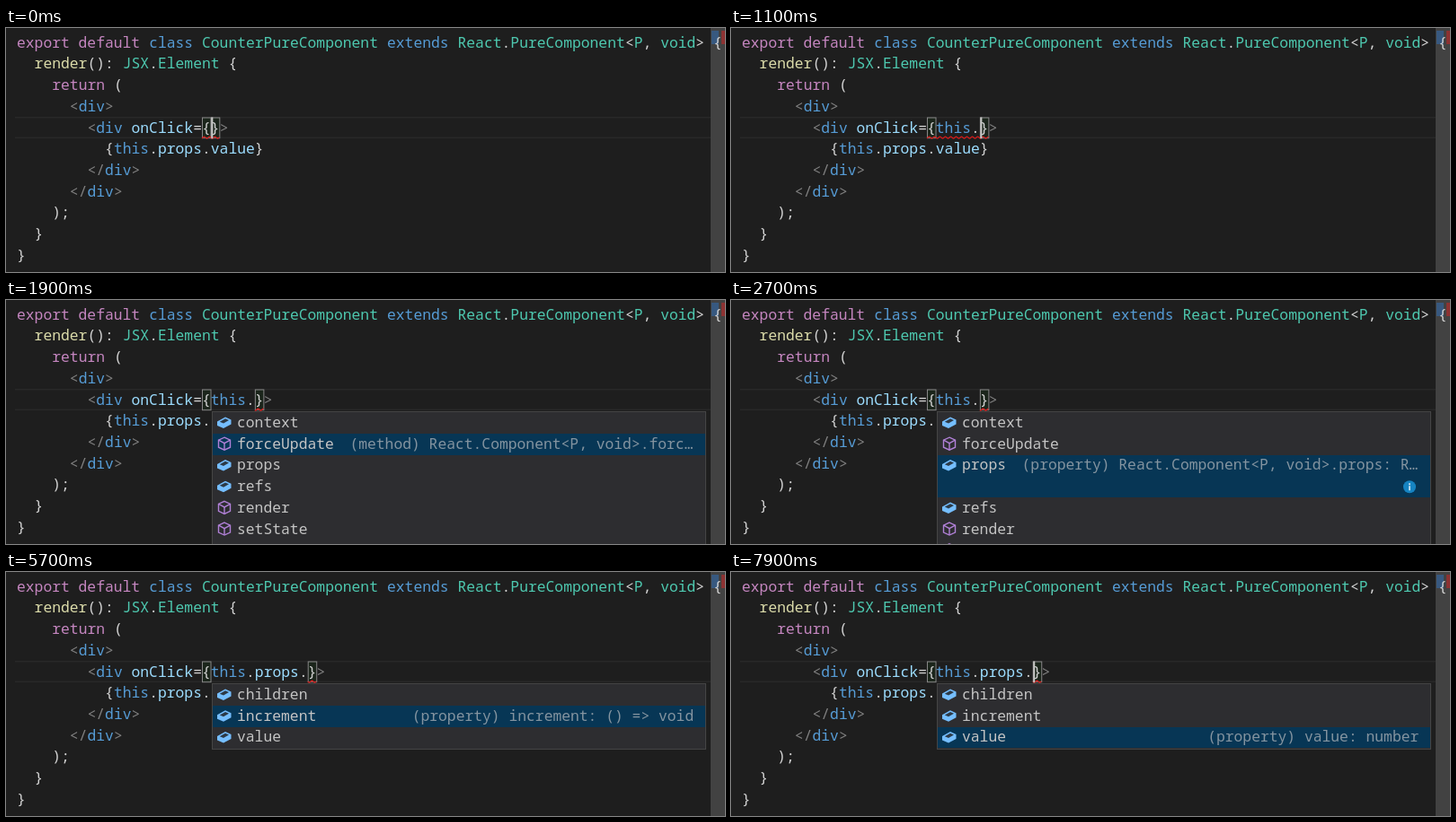
Animation of 800x272 px, one loop 8 s. Source, as an HTML page with a canvas:

```html
<!DOCTYPE html>
<html lang="en">
<head>
<meta charset="utf-8">
<title>Editor completion</title>
<style>
html, body { margin: 0; width: 100%; height: 100%; overflow: hidden; background: #1e1e1e; }
canvas { display: block; width: 800px; height: 272px; }
</style>
</head>
<body>
<canvas id="stage" width="800" height="272"></canvas>
<script>
const ctx = document.getElementById('stage').getContext('2d');
const LOOP = 8000, LEFT = 12, CHAR = 9.81, LINE = 23.72;
const FONT = '16.33px "Noto Sans Mono", "DejaVu Sans Mono", monospace';
const BRACE_COL = 21, EDIT_LINE = 4, ROW_TOP = 125.3;

// The first character of each token selects its colour.
const COLORS = {
  p: '#c586c0', b: '#569cd6', t: '#4ec9b0', f: '#dcdcaa',
  v: '#9cdcfe', w: '#d4d4d4', g: '#808080'
};
const CODE = [
  [0, 'pexport default ', 'bclass ', 'tCounterPureComponent ', 'bextends ', 'tReact',
    'w.', 'tPureComponent', 'w<', 'tP', 'w, ', 'tvoid', 'w> {'],
  [2, 'frender', 'w(): ', 'tJSX', 'w.', 'tElement', 'w {'],
  [4, 'preturn', 'w ('],
  [6, 'g<', 'bdiv', 'g>'],
  [8],
  [10, 'w{', 'bthis', 'w.', 'vprops', 'w.', 'vvalue', 'w}'],
  [8, 'g</', 'bdiv', 'g>'],
  [6, 'g</', 'bdiv', 'g>'],
  [4, 'w);'],
  [2, 'w}'],
  [0, 'w}']
];

const COMPONENT = 'React.Component<P, void>';
const prop = (name, detail) => ({ name, icon: 'property', detail: `(property) ${detail}` });
const method = (name, detail) => ({ name, icon: 'method', detail });
const type = (name, ...hits) => ({ name, icon: 'interface', hits });

const TYPES = [
  type('RTCIceTransportStateChangedEvent', 1, 21),
  type('RTCRtpHeaderExtension', 1, 6),
  type('RTCRtpHeaderExtensionParameters', 1, 6),
  type('RTCRtpUnhandled', 1, 8),
  type('SVGTextPathElement', 3, 10),
  type('Touch', 0, 4)
];
const MEMBERS = [
  prop('context', COMPONENT + '.contex…'),
  method('forceUpdate', `(method) ${COMPONENT}.forc…`),
  prop('props', COMPONENT + '.props: R…'),
  prop('refs', COMPONENT + '.refs'),
  method('render'),
  method('setState')
];
const PROPS = [
  prop('children', 'children: React.ReactNode'),
  prop('increment', 'increment: () => void'),
  prop('value', 'value: number')
];

// Each step overrides part of the editor state from its time on.
const STEPS = [
  [0, { typed: [], cursor: true, squiggle: [21, 23] }],
  [400, { cursor: false }],
  [800, { typed: ['vth'], cursor: true, squiggle: [21, 25] }],
  [900, { typed: ['vthi'], list: TYPES, squiggle: [21, 26] }],
  [1000, { typed: ['bthis'], list: null, squiggle: [21, 27] }],
  [1100, { typed: ['bthis', 'w.'], squiggle: [21, 28] }],
  [1200, { list: MEMBERS, selected: 0, detail: false }],
  [1300, { detail: true }],
  [1500, { squiggle: [27, 28] }],
  [1700, { cursor: false }],
  [1900, { selected: 1 }],
  [2100, { selected: 2 }],
  [2200, { expanded: true, cursor: true }],
  [2700, { cursor: false }],
  [3200, { cursor: true }],
  [3700, { cursor: false }],
  [4200, { typed: ['bthis', 'w.', 'vprops'], list: null, expanded: false, cursor: true, squiggle: null }],
  [4500, { squiggle: [13, 33] }],
  [4700, { cursor: false }],
  [4900, { typed: ['bthis', 'w.', 'vprops', 'w.'], list: PROPS, selected: 0, cursor: true }],
  [5200, { squiggle: [33, 34] }],
  [5400, { cursor: false }],
  [5700, { selected: 1 }],
  [5900, { cursor: true }],
  [6400, { cursor: false }],
  [6600, { selected: 2 }],
  [6900, { cursor: true }],
  [7400, { cursor: false }],
  [7900, { cursor: true }]
];

const colX = col => LEFT + col * CHAR;
const rowY = row => ROW_TOP + row * LINE;

function rect(color, x, y, w, h) {
  ctx.fillStyle = color;
  ctx.fillRect(x, y, w, h);
}

function text(str, x, y, color, weight = '') {
  ctx.font = `${weight} ${FONT}`;
  ctx.fillStyle = color;
  ctx.fillText(str, x, y);
}

function path(points, close) {
  ctx.beginPath();
  points.forEach(([x, y]) => ctx.lineTo(x, y));
  if (close) ctx.closePath();
}

function circle(x, y, r) {
  ctx.beginPath();
  ctx.arc(x, y, r, 0, Math.PI * 2);
}

function drawLine([col, ...tokens], row) {
  for (const token of tokens) {
    const word = token.slice(1);
    text(word, colX(col), 21.7 + row * LINE, COLORS[token[0]]);
    col += word.length;
  }
}

function drawSquiggle([from, to]) {
  const end = colX(to);
  ctx.beginPath();
  for (let x = colX(from); x <= end; x += 0.5) {
    ctx.lineTo(x, 122.1 + Math.sin(x * Math.PI / 3));
  }
  ctx.strokeStyle = '#e01818';
  ctx.lineWidth = 1.2;
  ctx.stroke();
}

function drawBracket(col) {
  const x = colX(col) + 0.5;
  rect('rgba(0,100,0,.1)', x, 100, 9.5, 22.7);
  ctx.strokeStyle = '#888';
  ctx.lineWidth = 1;
  ctx.strokeRect(x, 100, 9.5, 22.7);
}

const ICONS = {
  interface() {
    ctx.strokeStyle = '#75beff';
    ctx.lineWidth = 2;
    circle(-5, 0, 2);
    ctx.stroke();
    path([[-3, 0], [0, 0]]);
    ctx.stroke();
    circle(4, 0, 3.4);
    ctx.stroke();
  },
  property() {
    ctx.fillStyle = '#75beff';
    path([[-8, -1], [1, -6], [7.5, -3], [7.5, 2], [-1, 6.5], [-8, 3.5]], true);
    ctx.fill();
    ctx.fillStyle = '#2d3a46';
    path([[-5.2, -0.8], [1, -4.2], [5, -2.5], [-1, 1]], true);
    ctx.fill();
  },
  method() {
    ctx.strokeStyle = '#b180d7';
    ctx.lineWidth = 1.4;
    path([[0, -7], [6.5, -4], [6.5, 4], [0, 7], [-6.5, 4], [-6.5, -4]], true);
    ctx.stroke();
    path([[-6.5, -4], [0, -0.5], [6.5, -4]]);
    ctx.stroke();
    path([[0, -0.5], [0, 7]]);
    ctx.stroke();
  }
};

function drawInfo(x, y) {
  ctx.fillStyle = '#1684c2';
  circle(x, y, 7);
  ctx.fill();
  rect('#b5d6ea', x - 1, y - 4, 2, 2);
  rect('#b5d6ea', x - 1, y - 1, 2, 5);
}

function drawItem(item, row, state, selected) {
  const top = rowY(row);
  const baseline = top + 16.7;
  if (selected) {
    const start = Math.round(top);
    const end = Math.round(rowY(row + (state.expanded ? 2 : 1)));
    rect('#073655', 230, start, 548, end - start);
  }

  ctx.save();
  ctx.translate(243, top + 11.2);
  ICONS[item.icon]();
  ctx.restore();

  [...item.name].forEach((char, i) => {
    const hit = item.hits && item.hits.includes(i);
    text(char, 257 + i * CHAR, baseline, hit ? '#0097fb' : '#c4c4c4', hit ? 'bold' : '');
  });

  if (selected && state.detail) {
    const left = item.detail.endsWith('…')
      ? 257 + item.name.length * CHAR + 17.5
      : 765.6 - item.detail.length * CHAR;
    text(item.detail, left, baseline, '#8494a0');
  }
  if (selected && state.expanded) drawInfo(755, top + 35.5);
}

function drawPopup(state) {
  const { list, selected } = state;
  const height = list === PROPS ? 74 : 170;
  rect('#1e1e1e', 228, 124, 1, height);
  rect('#454545', 229, 124, 550, height);
  rect('#2d2d30', 230, 125, 548, height - 2);
  list.forEach((item, i) => {
    const row = i + (state.expanded && i > selected ? 1 : 0);
    drawItem(item, row, state, i === selected);
  });
}

function drawScrollbar() {
  rect('#424242', 784, 0, 16, 272);
  rect('rgba(50,105,170,.6)', 785, 3, 8, 15);
  rect('rgba(190,40,40,.6)', 796, 3, 4, 15);
}

function stateAt(time) {
  return Object.assign({}, ...STEPS.filter(([start]) => start <= time).map(([, change]) => change));
}

function draw(time) {
  const state = stateAt(time);
  const typed = state.typed;
  const caretCol = BRACE_COL + 1 + typed.join('').length - typed.length;

  rect('#1e1e1e', 0, 0, 800, 272);
  rect('#282828', 10, 99, 774, 1.5);
  rect('#282828', 10, 121.5, 774, 1.5);
  drawScrollbar();
  drawBracket(BRACE_COL);
  drawBracket(caretCol);
  CODE.forEach(drawLine);
  drawLine([8, 'g<', 'bdiv ', 'vonClick', 'w={', ...typed, 'w}', 'g>'], EDIT_LINE);
  if (state.squiggle) drawSquiggle(state.squiggle);
  if (state.cursor) rect('#c8c8c6', colX(caretCol) + 0.5, 99.5, 2, 23.7);
  if (state.list) drawPopup(state);
}

function tick() {
  draw(performance.now() % LOOP);
  requestAnimationFrame(tick);
}
tick();
</script>
</body>
</html>
```
